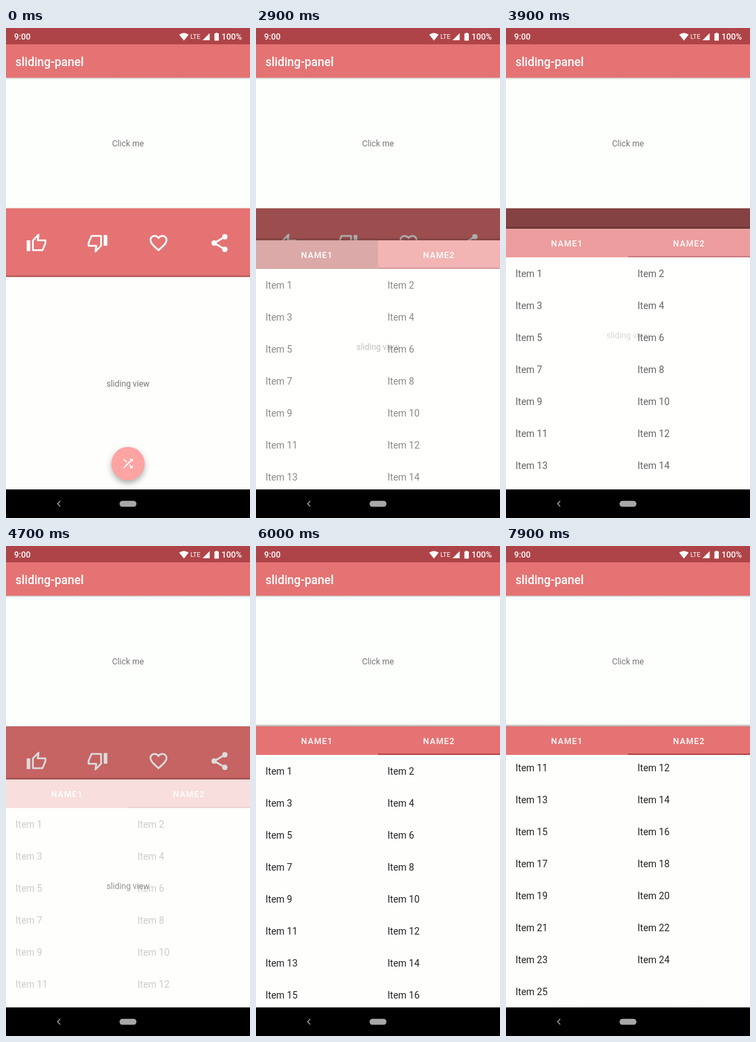
Write an HTML page with a canvas that moves like this. It is 360x720 px and loops after 8 s.

```html
<!DOCTYPE html>
<html lang="en">
<head>
<meta charset="utf-8">
<title>sliding-panel</title>
<style>
  html, body { margin: 0; width: 100%; height: 100%; overflow: hidden; background: #fdfefc; }
  canvas { display: block; width: 360px; height: 720px; }
</style>
</head>
<body>
<canvas id="stage"></canvas>
<script>
const W = 360, H = 720, LOOP = 8000, TICK = 100;
const OPEN = 265, CLOSED = 366, TAB_H = 42, NAV_TOP = 678, ROW = 47, ITEMS = 25;
const PINK = '#e57373', DARK = '#af4448', LIGHT = '#ffa4a2', PAPER = '#fdfffd', GREY = '#757575';

const canvas = document.getElementById('stage');
const ctx = canvas.getContext('2d');
const dpr = window.devicePixelRatio || 1;
canvas.width = W * dpr;
canvas.height = H * dpr;

const thumb = new Path2D('M8 9L14.3 2.6L13.4 9H22V12.2L18.7 20H8Z');
const heart = new Path2D('M12 20C6 14.6 3 12 3 8.5C3 6 5 4 7.5 4C9.4 4 11.3 5.1 12 6.5' +
  'C12.7 5.1 14.6 4 16.5 4C19 4 21 6 21 8.5C21 12 18 14.6 12 20Z');
const shuffle = new Path2D('M10.6 9.2L5.4 4L4 5.4L9.2 10.6ZM14.5 4L16.5 6L4 18.6L5.4 20L18 7.5L20 9.5V4Z' +
  'M14.8 13.4L13.4 14.8L16.5 18L14.5 20H20V14.5L18 16.5Z');

const clamp = v => Math.max(0, Math.min(1, v));
const smooth = u => u * u * (3 - 2 * u);
const ramp = (t, from, to) => clamp((t - from) / (to - from));

// Drags of the panel: start, end, top edge reached.
const drags = [
  [1200, 2143, OPEN], [2600, 3196, 358], [3300, 4242, 268], [4300, 4862, 362], [5000, 5800, OPEN]
];

function panelTop(t) {
  let y = CLOSED;
  for (const [start, end, goal] of drags) y += (goal - y) * smooth(ramp(t, start, end));
  return y;
}

function rect(x, y, w, h, color) {
  ctx.fillStyle = color;
  ctx.fillRect(x, y, w, h);
}

// y is the middle of the capital letters.
function text(str, x, y, size, color, { weight = 400, align = 'left', spacing = 0 } = {}) {
  ctx.font = `${weight} ${size}px Roboto, sans-serif`;
  ctx.textAlign = align;
  ctx.letterSpacing = spacing + 'px';
  ctx.fillStyle = color;
  ctx.fillText(str, x, y + size * 0.356);
}

function shape(points, color) {
  ctx.beginPath();
  points.forEach(([x, y]) => ctx.lineTo(x, y));
  ctx.closePath();
  ctx.fillStyle = color;
  ctx.fill();
}

function disc(x, y, r, color) {
  ctx.beginPath();
  ctx.arc(x, y, r, 0, 7);
  ctx.fillStyle = color;
  ctx.fill();
}

function shadow(y, h, alpha) {
  const fade = ctx.createLinearGradient(0, y, 0, y + h);
  const [a, b] = h > 0 ? [alpha, 0] : [alpha, 0];
  fade.addColorStop(0, `rgba(0,0,0,${a})`);
  fade.addColorStop(1, `rgba(0,0,0,${b})`);
  rect(0, Math.min(y, y + h), W, Math.abs(h), fade);
}

// Draws in a 24-unit icon grid centred on x, y.
function icon(x, y, scale, draw) {
  ctx.save();
  ctx.translate(x, y);
  ctx.scale(scale, scale);
  ctx.translate(-12, -12);
  ctx.strokeStyle = ctx.fillStyle = '#fff';
  ctx.lineWidth = 2;
  ctx.lineJoin = 'round';
  draw();
  ctx.restore();
}

function drawThumb() {
  ctx.stroke(thumb);
  ctx.fillRect(1, 9, 4, 12);
}

function drawShare() {
  ctx.beginPath();
  ctx.moveTo(18, 5);
  ctx.lineTo(6, 12);
  ctx.lineTo(18, 19);
  ctx.stroke();
  [[18, 5], [6, 12], [18, 19]].forEach(([x, y]) => disc(x, y, 3, '#fff'));
}

function drawBars() {
  rect(0, 24, W, 49, PINK);
  shadow(73, 3, 0.22);
  rect(0, 0, W, 24, DARK);
  text('sliding-panel', 14, 50, 17.5, '#fff', { weight: 500 });
  text('9:00', 12, 13, 12.26, '#fff', { weight: 500 });
  text('LTE', 272, 13, 9.5, '#fff');
  text('100%', 318, 13, 12.26, '#fff', { weight: 500 });

  ctx.beginPath();
  ctx.moveTo(262.5, 18.5);
  ctx.lineTo(255.5, 9.8);
  ctx.quadraticCurveTo(262.5, 4.8, 269.5, 9.8);
  ctx.fillStyle = '#fff';
  ctx.fill();
  shape([[290, 18], [300.5, 18], [300.5, 7.5]], '#fff');
  rect(307.5, 8, 6.5, 10.5, '#fff');
  rect(309.3, 7, 3, 1, '#fff');
}

function drawActions(progress) {
  shadow(OPEN, -2, 0.12);
  rect(0, OPEN, W, CLOSED - OPEN, PINK);
  icon(45, 316, 1.314, drawThumb);
  icon(135, 316, 1.314, () => {
    ctx.translate(24, 24);
    ctx.rotate(Math.PI);
    drawThumb();
  });
  icon(225, 316, 1.314, () => ctx.stroke(heart));
  icon(315, 316, 1.314, drawShare);
  rect(0, OPEN, W, CLOSED - OPEN, `rgba(0,0,0,${0.6 * progress})`);
}

function drawRipple(t, top) {
  const grow = ramp(t, 2500, 2850);
  const alpha = 0.12 * grow * (1 - ramp(t, 2900, 3200));
  if (alpha <= 0) return;
  ctx.save();
  ctx.beginPath();
  ctx.rect(0, top, W / 2, TAB_H);
  ctx.clip();
  disc(90, top + 21, 20 + 80 * grow, `rgba(0,0,0,${alpha * 1.6})`);
  ctx.restore();
}

function drawList(t, top) {
  const scroll = 240 * smooth(ramp(t, 6500, 7400));
  for (let i = 0; i < ITEMS; i++) {
    const y = top + 66 + Math.floor(i / 2) * ROW - scroll;
    if (y > top && y < NAV_TOP + 20) text(`Item ${i + 1}`, i % 2 ? 194 : 14, y, 14, '#212121');
  }
  rect(0, top, W, TAB_H, PINK);
  rect(W / 2, top + TAB_H - 2, W / 2, 2, DARK);
}

function drawGlow(t) {
  const alpha = 0.25 * ramp(t, 7200, 7400) * (1 - ramp(t, 7400, 7950));
  if (alpha <= 0) return;
  ctx.beginPath();
  ctx.ellipse(W / 2, NAV_TOP + 8, 215, 10 + 90 * alpha, 0, 0, 7);
  ctx.fillStyle = `rgba(229,115,115,${alpha})`;
  ctx.fill();
}

function drawFab(top, progress) {
  const size = clamp(1 - progress / 0.12);
  if (size <= 0) return;
  ctx.save();
  ctx.translate(180, top + 274);
  ctx.scale(size, size);
  ctx.shadowColor = 'rgba(0,0,0,0.32)';
  ctx.shadowBlur = 8 * dpr;
  ctx.shadowOffsetY = 4 * dpr;
  disc(0, 0, 24.5, LIGHT);
  ctx.shadowColor = 'transparent';
  icon(0, 0, 0.876, () => ctx.fill(shuffle));
  ctx.restore();
}

function drawPanel(t, top, progress) {
  shadow(top, -4, 0.25);
  rect(0, top, W, NAV_TOP - top, '#fefefd');
  if (progress > 0) {
    drawList(t, top);
    drawRipple(t, top);
    // A paper veil stands for the opacity of the whole list.
    rect(0, top, W, NAV_TOP - top, `rgba(254,254,253,${1 - progress})`);
    for (const [label, x] of [['NAME1', 90], ['NAME2', 270]]) {
      text(label, x, top + 21.5, 12.26, '#fff', { weight: 500, align: 'center', spacing: 1.09 });
    }
    drawGlow(t);
  }
  ctx.globalAlpha = 1 - progress;
  text('sliding view', 180, top + 157, 12.26, GREY, { align: 'center' });
  ctx.globalAlpha = 1;
  drawFab(top, progress);
}

function drawNav() {
  rect(0, NAV_TOP, W, H - NAV_TOP, '#000');
  ctx.beginPath();
  ctx.moveTo(80, 695);
  ctx.lineTo(76, 699);
  ctx.lineTo(80, 703);
  ctx.strokeStyle = '#b0b0b0';
  ctx.lineWidth = 1.2;
  ctx.stroke();
  ctx.beginPath();
  ctx.roundRect(167.5, 694.8, 25, 8.6, 4.3);
  ctx.fillStyle = '#a8a8a8';
  ctx.fill();
}

function render(t) {
  const top = panelTop(t);
  const progress = clamp((CLOSED - top) / (CLOSED - OPEN));
  ctx.setTransform(dpr, 0, 0, dpr, 0, 0);
  rect(0, 0, W, H, PAPER);
  drawBars();
  text('Click me', 180, 170, 12.26, GREY, { align: 'center' });
  drawActions(progress);
  drawPanel(t, top, progress);
  drawNav();
}

const begin = performance.now();
function frame() {
  const t = (performance.now() - begin) % LOOP;
  render(Math.floor(t / TICK) * TICK);
  requestAnimationFrame(frame);
}
frame();
</script>
</body>
</html>
```
